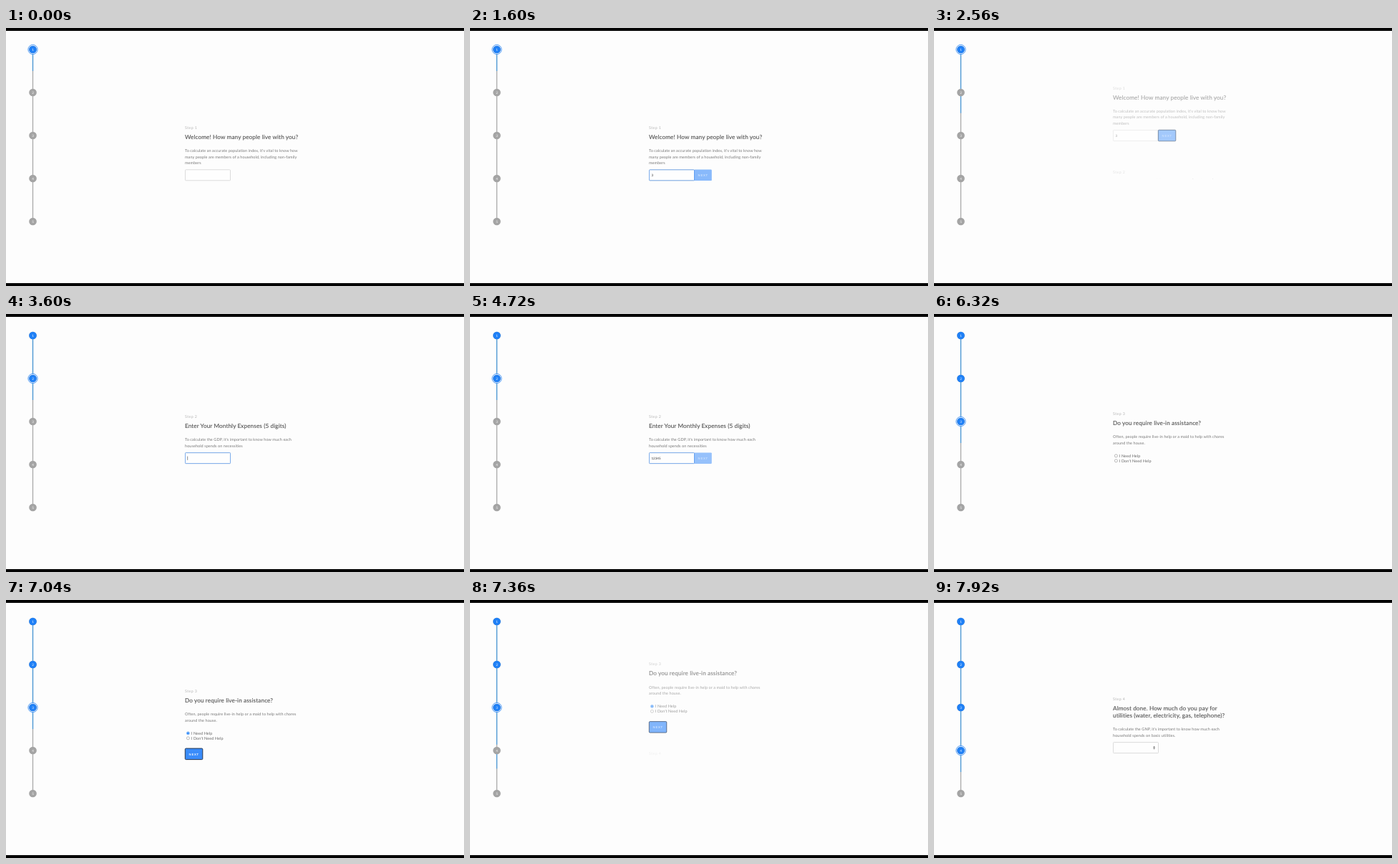
Animation of 640 by 360 pixels, one loop 8 s. Source, as an HTML page with a canvas:

```html
<!DOCTYPE html>
<html lang="en">
<head>
<meta charset="utf-8">
<title>Step form</title>
<style>
html, body { margin: 0; width: 100%; height: 100%; overflow: hidden; background: #fdfdfd; }
canvas { display: block; width: 640px; height: 360px; }
</style>
</head>
<body>
<canvas id="stage"></canvas>
<script>
const canvas = document.getElementById('stage');
const ctx = canvas.getContext('2d');
const dpr = window.devicePixelRatio || 1;
canvas.width = 640 * dpr;
canvas.height = 360 * dpr;

const LOOP = 8000, TICK = 80, SLIDE = 800, TRAVEL = 113;
const LEFT = 250, RAIL = 37.5;
const BLUE = '#1f80f6', LINE = '#4395d8', GRAY = '#a4a4a4', PAPER = '#fdfdfd';
const FONT = 'Lato, "Open Sans", sans-serif';

const steps = [
  { y: 140.8, bottom: 211,
    head: ['Welcome! How many people live with you?'],
    body: ["To calculate an accurate population index, it's vital to know how",
      'many people are members of a household, including non-family', 'members'],
    focus: [600, 800], spin: [400, 1280], typed: [1040], value: '3',
    next: [1240, 1840], click: 2000, leave: 2165 },
  { y: 144.8, bottom: 211,
    head: ['Enter Your Monthly Expenses (5 digits)'],
    body: ["To calculate the GDP, it's important to know how much each",
      'household spends on necessities'],
    focus: [3140, 3520], spin: [3200, 3520], typed: [4000, 4000, 4080, 4080, 4160], value: '12345',
    next: [4360, 5040], click: 5160, leave: 5167 },
  { y: 140.8, bottom: 224,
    head: ['Do you require live-in assistance?'],
    body: ['Often, people require live-in help or a maid to help with chores', 'around the house.'],
    radios: ['I Need Help', "I Don't Need Help"], picked: 6400,
    next: [6400, 6960], click: 7040, leave: 7040 },
  { y: 140.4, bottom: 215,
    head: ['Almost done. How much do you pay for', 'utilities (water, electricity, gas, telephone)?'],
    body: ["To calculate the GNP, it's important to know how much each",
      'household spends on basic utilities.'],
    focus: [LOOP, LOOP + 1], spin: [7760, LOOP], typed: [], value: '',
    next: [LOOP, LOOP + 1], click: LOOP, leave: LOOP }
];

const clamp = v => Math.max(0, Math.min(1, v));
const ramp = (t, a, b) => clamp((t - a) / (b - a));

// cubic-bezier(.42, 0, .58, 1), solved by bisection
function ease(x) {
  if (x <= 0 || x >= 1) return clamp(x);
  let lo = 0, hi = 1, s = 0.5;
  for (let i = 0; i < 18; i++) {
    s = (lo + hi) / 2;
    const bx = 3 * 0.42 * s * (1 - s) ** 2 + 3 * 0.58 * s * s * (1 - s) + s ** 3;
    if (bx < x) lo = s; else hi = s;
  }
  return s * s * (3 - 2 * s);
}

function text(str, x, y, size, color, { track = 0.013 * size, weight = 400, heavy = 0, align = 'left' } = {}) {
  ctx.font = `${weight} ${size}px ${FONT}`;
  ctx.letterSpacing = track + 'px';
  ctx.textAlign = align;
  ctx.fillStyle = color;
  ctx.fillText(str, x, y);
  if (heavy) {
    ctx.strokeStyle = color;
    ctx.lineWidth = heavy;
    ctx.strokeText(str, x, y);
  }
}

function box(x, y, w, h, r, fill, stroke, width = 1) {
  ctx.beginPath();
  ctx.roundRect(x, y, w, h, r);
  if (fill) { ctx.fillStyle = fill; ctx.fill(); }
  if (stroke) { ctx.strokeStyle = stroke; ctx.lineWidth = width; ctx.stroke(); }
}

function disc(x, y, r, fill, stroke, width = 1) {
  ctx.beginPath();
  ctx.arc(x, y, r, 0, Math.PI * 2);
  if (fill) { ctx.fillStyle = fill; ctx.fill(); }
  if (stroke) { ctx.strokeStyle = stroke; ctx.lineWidth = width; ctx.stroke(); }
}

function faded(alpha, draw) {
  if (alpha <= 0) return;
  ctx.save();
  ctx.globalAlpha *= alpha;
  draw();
  ctx.restore();
}

function button(x, y, alpha, focused) {
  faded(alpha, () => {
    box(x, y, 24.5, 15.5, 1.2, '#3a8cfa', focused ? '#26364d' : null);
    text('NEXT', x + 5.3, y + 9.4, 4.2, '#fff', { track: 0.85, weight: 700 });
  });
}

function spinner(x, y) {
  ctx.fillStyle = '#666';
  for (const d of [-1, 1]) {
    ctx.beginPath();
    ctx.moveTo(x - 1.3, y + d * 0.4);
    ctx.lineTo(x + 1.3, y + d * 0.4);
    ctx.lineTo(x, y + d * 2.3);
    ctx.fill();
  }
}

function field(s, y, t) {
  box(LEFT + 0.5, y + 0.5, 63, 15, 0.8, '#fefefe', '#d9d9d9', 0.9);
  const focus = ramp(t, ...s.focus) * (1 - ramp(t, s.leave, s.leave + 200));
  faded(focus, () => box(LEFT + 0.5, y + 0.5, 63, 15, 0.8, null, '#72a7ee', 0.9));
  const shown = s.typed.filter(at => t >= at).length;
  text(s.value.slice(0, shown), 253.5, y + 9.7, 4.5, '#333', { track: 0 });
  if (t >= s.focus[1] && t < s.next[0]) {
    ctx.fillStyle = '#444';
    ctx.fillRect(253.5 + shown * 2.65, y + 5.5, 0.6, 5.2);
  }
  if (t >= s.spin[0] && t < s.spin[1]) spinner(307.6, y + 8);
  button(313.3, y + 0.3, ramp(t, ...s.next), t >= s.click);
}

function choices(s, y, t) {
  s.radios.forEach((label, i) => {
    const cy = y + i * 6.9, on = i === 0 && t >= s.picked;
    disc(254.4, cy, 2, '#fff', on ? BLUE : '#8c8c8c', 0.6);
    if (on) disc(254.4, cy, 1.35, BLUE);
    text(label, 258.8, cy + 1.9, 5.5, '#666');
  });
  button(LEFT + 0.3, y + 21.2, ramp(t, ...s.next), t >= s.click);
}

function panel(s, t) {
  let y = s.y;
  if (s.radios) y -= 12 * ease(ramp(t, ...s.next));
  text('Step ' + (steps.indexOf(s) + 1), LEFT, y, 5.3, '#b4b4b4', { track: 0.42 });
  y += 14;
  s.head.forEach((line, i) => text(line, LEFT, y + i * 9.4, 8.2, '#4c4c4c', { heavy: 0.08 }));
  y += (s.head.length - 1) * 9.4 + 18.6;
  s.body.forEach((line, i) => text(line, LEFT, y + i * 8.2, 5.5, '#777'));
  y += (s.body.length - 1) * 8.2;
  if (s.radios) choices(s, y + 16.3, t);
  else field(s, y + 7.5, t);
}

function rail(t) {
  const bar = (from, to, color) => {
    ctx.fillStyle = color;
    ctx.fillRect(RAIL - 0.6, from, 1.2, to - from);
  };
  bar(30, 270, GRAY);
  bar(30, 60, LINE);
  for (let i = 0; i < 3; i++) {
    const dt = t - steps[i].leave, top = 60 + i * 60;
    if (dt <= 0) continue;
    bar(top, top + 30 * ramp(dt, 110, 400), LINE);
    bar(top + 30, top + 30 + 30 * (1 - (1 - clamp(dt / 450)) ** 1.5), LINE);
  }
  for (let i = 0; i < 5; i++) {
    const y = 30 + i * 60;
    const arrive = at => ramp(t, at + 440, at + 680);
    const lit = i === 0 ? 1 : i > 3 ? 0 : arrive(steps[i - 1].leave);
    const ring = lit * (i < 3 ? 1 - arrive(steps[i].leave) : 1);
    faded(ring, () => disc(RAIL, y, 6.6, PAPER, BLUE, 0.8));
    disc(RAIL, y, 5.3, GRAY);
    faded(lit, () => disc(RAIL, y, 5.3, BLUE));
    text(String(i + 1), RAIL, y + 1.6, 4.6, '#fff', { track: 0, align: 'center' });
  }
}

function draw(t) {
  ctx.setTransform(dpr, 0, 0, dpr, 0, 0);
  ctx.textRendering = 'geometricPrecision';
  ctx.fillStyle = PAPER;
  ctx.fillRect(0, 0, 640, 360);
  rail(t);

  steps.forEach((s, i) => {
    const prev = steps[i - 1];
    const come = prev ? ease(ramp(t, prev.leave, prev.leave + SLIDE)) : 1;
    const go = ease(ramp(t, s.leave, s.leave + SLIDE));
    if (come <= 0 || go >= 1) return;
    faded(come ** 1.5 * clamp(1 - 1.1 * go), () => {
      if (come < 1) {
        // the arriving panel stays hidden below the leaving one's box
        ctx.beginPath();
        ctx.rect(0, 0, 640, prev.bottom);
        ctx.clip();
      }
      ctx.translate(0, TRAVEL * (1 - come - go));
      panel(s, t);
    });
  });

  ctx.fillStyle = '#000';
  ctx.fillRect(0, 0, 640, 4);
  ctx.fillRect(0, 356, 640, 4);
}

function frame() {
  const t = performance.now() % LOOP;
  draw(Math.floor(t / TICK) * TICK);
  requestAnimationFrame(frame);
}
frame();
</script>
</body>
</html>
```
